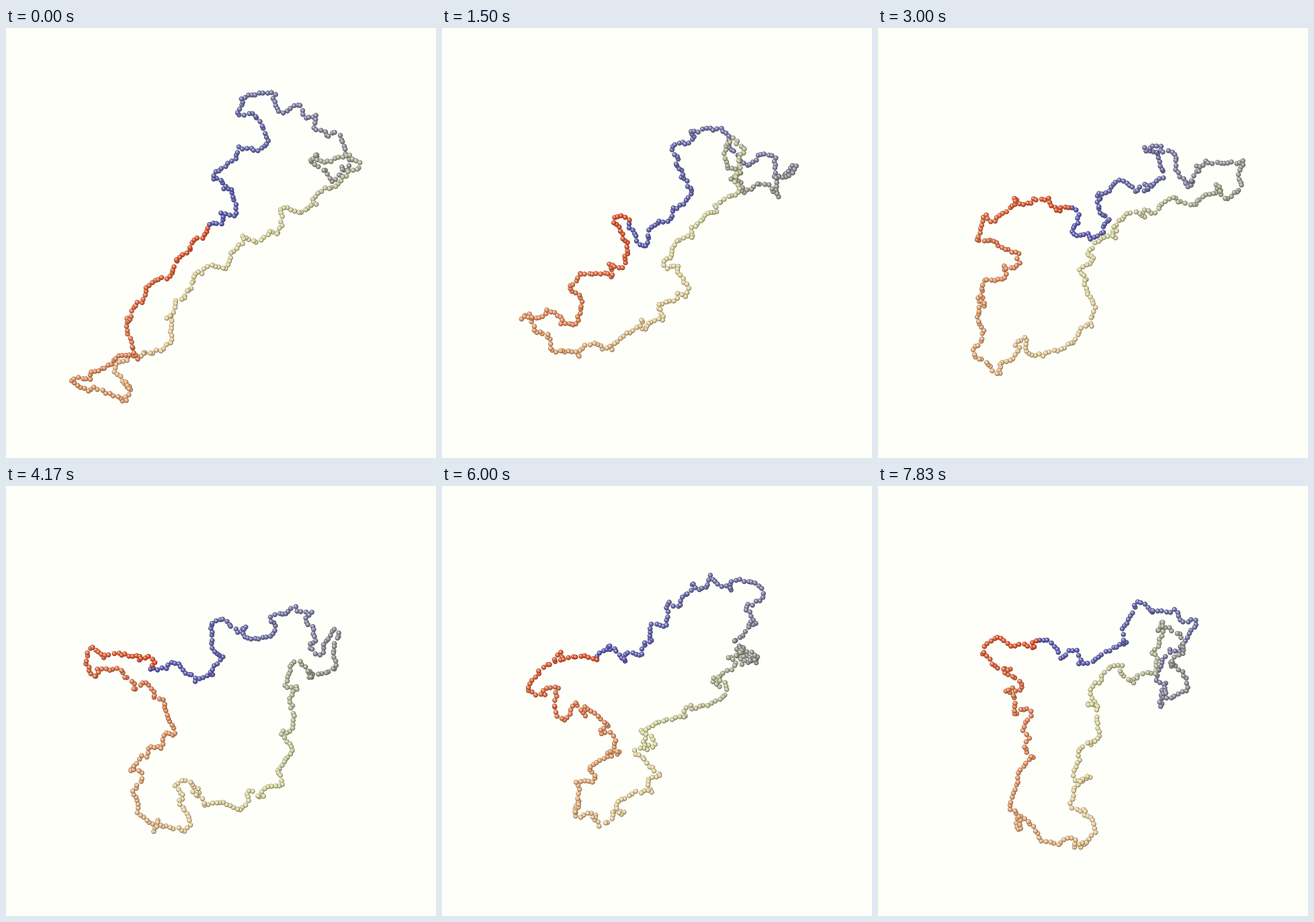
Recreate the animation shown at these times as a matplotlib script. Size 640x640 px, loop 8 s.

```python
import numpy as np
import matplotlib.pyplot as plt
from matplotlib.animation import FuncAnimation

SIZE, DPI = 640, 100
FRAMES, LOOP_MS = 48, 8000
BEADS, FINE = 345, 1400

# Rough ring outlines as x, y pairs, from the blue end round to the red end.
stretched = [303, 297, 343, 262, 314, 215, 390, 160, 347, 118, 386, 100, 488, 163,
             505, 225, 450, 195, 525, 200, 485, 237, 411, 288, 330, 340, 250, 410,
             245, 460, 168, 510, 190, 548, 104, 527, 191, 483, 181, 430, 258, 345]
drawn_in = [279, 291, 302, 312, 368, 240, 344, 193, 375, 158, 417, 149, 436, 187,
            520, 212, 478, 242, 426, 215, 438, 167, 437, 234, 333, 345, 364, 368,
            332, 420, 230, 480, 165, 471, 125, 425, 205, 438, 198, 379, 275, 348,
            259, 292]
bent = [287, 277, 295, 308, 340, 300, 330, 245, 418, 230, 404, 168, 475, 238,
        470, 203, 533, 205, 520, 244, 400, 272, 310, 349, 316, 441, 242, 486,
        207, 465, 190, 510, 155, 497, 155, 400, 210, 340, 147, 307, 222, 256]
boxy = [224, 264, 310, 283, 310, 203, 385, 227, 400, 193, 448, 188, 461, 249,
        490, 217, 480, 283, 425, 268, 425, 325, 400, 443, 303, 478, 270, 438,
        255, 505, 210, 500, 192, 412, 248, 370, 210, 300, 120, 268, 140, 247]
hooked = [231, 249, 284, 254, 308, 208, 350, 188, 415, 204, 450, 163, 464, 220,
          422, 250, 501, 242, 485, 285, 402, 275, 400, 322, 318, 402, 268, 405,
          300, 435, 228, 450, 205, 499, 174, 470, 205, 420, 284, 377, 159, 325,
          165, 285]
tall = [229, 256, 265, 237, 310, 256, 375, 173, 485, 200, 428, 222, 475, 245,
        453, 290, 400, 230, 442, 215, 425, 300, 295, 325, 335, 400, 340, 460,
        295, 525, 280, 485, 263, 512, 202, 500, 222, 412, 210, 330, 137, 294,
        155, 235]
narrow = [258, 234, 306, 263, 378, 230, 385, 182, 472, 210, 432, 255, 407, 337,
          441, 303, 455, 230, 412, 213, 400, 280, 338, 270, 315, 317, 338, 370,
          298, 402, 284, 475, 315, 492, 303, 547, 225, 513, 200, 480, 228, 360,
          200, 320, 232, 290, 175, 240]

KEYS = [0, 9, 18, 25, 31, 42, 47]

# One loop thrown out between each two poses: place on the ring, dx, dy.
SWINGS = [(0.72, -10, 55), (0.77, -40, 15), (0.18, 0, -28),
          (0.33, 26, 0), (0.15, 0, -45), (0.92, -18, 0)]


def spline(flat, steps=30):
    """Closed Catmull-Rom curve through x, y pairs."""
    p1 = np.array(flat, float).reshape(-1, 2)
    p0, p2, p3 = (np.roll(p1, k, axis=0) for k in (1, -1, -2))
    t = np.linspace(0, 1, steps, endpoint=False)[:, None, None]
    curve = 0.5 * (2 * p1 + (p2 - p0) * t
                   + (2 * p0 - 5 * p1 + 4 * p2 - p3) * t**2
                   + (3 * p1 - p0 - 3 * p2 + p3) * t**3)
    return curve.transpose(1, 0, 2).reshape(-1, 2)


def resample(curve, n):
    """n points evenly spaced along a closed curve."""
    ring = np.vstack([curve, curve[:1]])
    dist = np.r_[0, np.cumsum(np.hypot(*np.diff(ring, axis=0).T))]
    at = np.linspace(0, dist[-1], n, endpoint=False)
    return np.column_stack([np.interp(at, dist, ring[:, i]) for i in (0, 1)])


POSES = [resample(spline(p), FINE)
         for p in (stretched, drawn_in, bent, boxy, hooked, tall, narrow)]

rng = np.random.default_rng(4)
place = np.arange(FINE) / FINE
modes = np.arange(18, 70)
phase = rng.uniform(0, 2 * np.pi, (2, modes.size))
speed = rng.uniform(-0.7, 0.7, (2, modes.size))


def ripple(frame):
    """Thermal waves running along the ring."""
    angle = 2 * np.pi * place[:, None] * modes
    return np.column_stack([(np.cos(angle + phase[i] + speed[i] * frame) * 34 / modes).sum(axis=1)
                            for i in (0, 1)])


def chain(frame):
    k = min(np.searchsorted(KEYS, frame, side="right") - 1, len(KEYS) - 2)
    t = (frame - KEYS[k]) / (KEYS[k + 1] - KEYS[k])
    lift = np.sin(np.pi * t)
    where, dx, dy = SWINGS[k]
    bump = lift * np.exp(-((place - where) / 0.05) ** 2)
    curve = (1 - t) * POSES[k] + t * POSES[k + 1] + np.outer(bump, (dx, dy))
    beads = resample(curve + (1 + 0.3 * lift) * ripple(frame), BEADS)
    jitter = np.random.default_rng(frame).normal(0, 1.15, (BEADS, 2))
    return beads + np.clip(jitter, -2.5, 2.5)


STOPS = [0, 0.2, 0.33, 0.5, 0.65, 0.8, 1]
COLORS = ["#5f5fbc", "#7c7cac", "#a0a094", "#dedea5", "#eed4a0", "#ec9e6c", "#e8542c"]


def gradient():
    rgb = [plt.matplotlib.colors.to_rgb(c) for c in COLORS]
    s = np.linspace(0, 1, BEADS)
    return np.column_stack([np.interp(s, STOPS, c) for c in zip(*rgb)])


# Each bead is three stacked discs, kept together so that beads overlap properly.
body = gradient()
shades = np.stack([body * 0.62, body, 0.4 * body + 0.57], axis=1).reshape(-1, 3)
offsets = np.array([(0, 0), (-0.4, -0.5), (-0.9, -1.1)])
diameters = np.tile([7.4, 5.8, 2.7], BEADS) * 72 / DPI


def discs(frame):
    return (chain(frame)[:, None] + offsets).reshape(-1, 2)


fig = plt.figure(figsize=(SIZE / DPI, SIZE / DPI), dpi=DPI, facecolor="#fffffa")
ax = fig.add_axes([0, 0, 1, 1])
ax.set(xlim=(0, SIZE), ylim=(SIZE, 0))
ax.axis("off")
start = discs(0)
dots = ax.scatter(start[:, 0], start[:, 1], s=diameters**2, c=shades, linewidths=0)


def update(frame):
    dots.set_offsets(discs(frame))
    return dots,


anim = FuncAnimation(fig, update, frames=FRAMES, interval=LOOP_MS / FRAMES,
                     repeat=True, repeat_delay=0)
plt.show()
```
